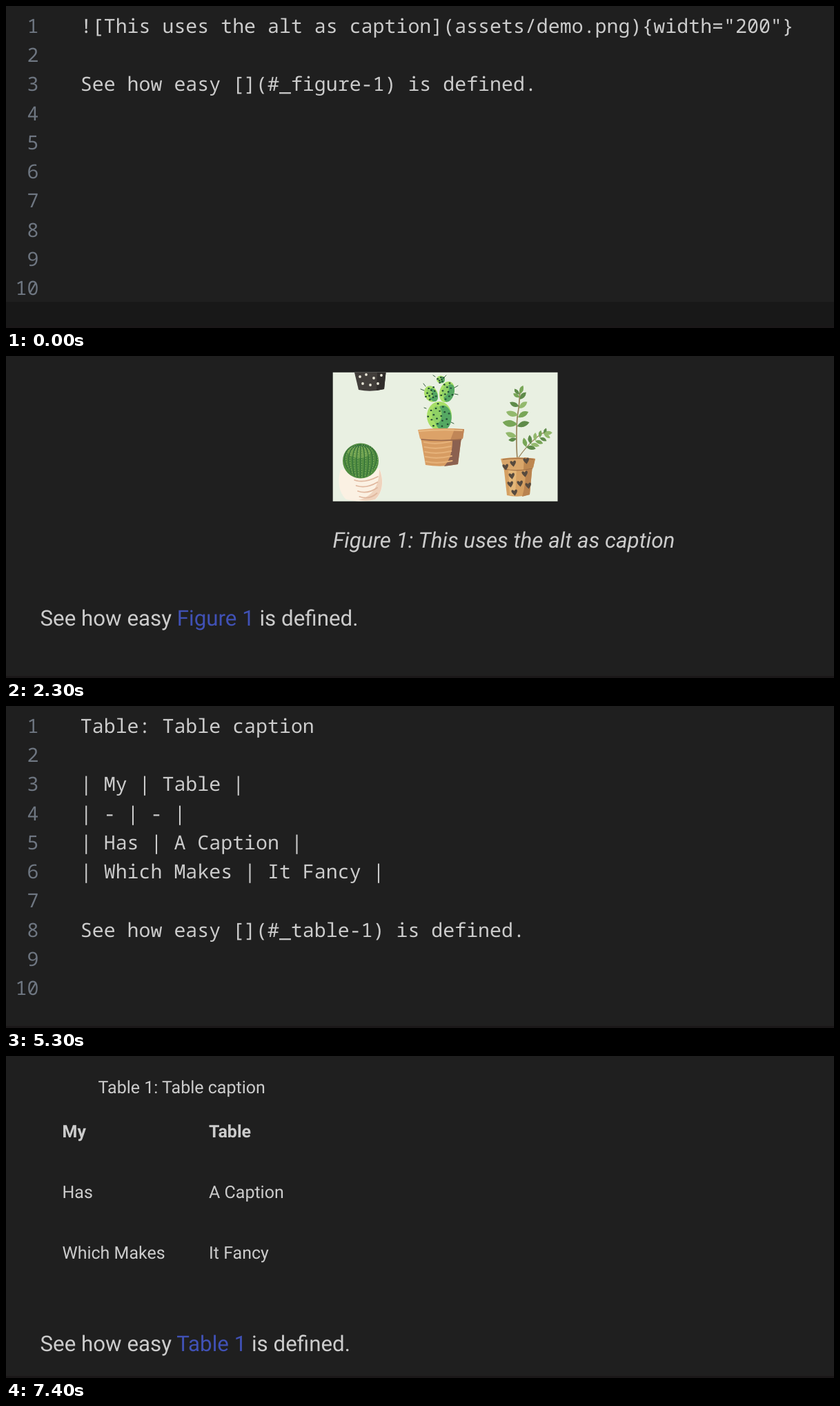
Write an HTML page that moves like this. It is 1200 by 467 pixels and loops after 8000 ms.

```html
<!DOCTYPE html>
<html lang="en">
<head>
<meta charset="utf-8">
<title>Captions demo</title>
<style>
  html, body { margin: 0; width: 100%; height: 100%; overflow: hidden; background: #1f1f1f; }
  svg { display: block; width: 100vw; height: 100vh; }
  text { fill: #ccc; white-space: pre; text-rendering: geometricPrecision; }
  .code { font: 500 28.25px "Noto Sans Mono", monospace; font-variant-ligatures: none; }
  .number { fill: #6e7681; text-anchor: end; }
  .body { font: 31.3px Roboto, sans-serif; }
  .caption { font: italic 31.46px Roboto, sans-serif; }
  .cell { font: 25px Roboto, sans-serif; }
  .bold { font-weight: 700; }
  .link { fill: #4051b5; }
</style>
</head>
<body>
<svg id="stage" viewBox="0 0 1200 467" preserveAspectRatio="none"></svg>
<script>
const LOOP = 8000;
const SCENE_STARTS = [0, 500, 3500, 6500];
const stage = document.getElementById("stage");

function add(parent, tag, attrs = {}, content = "") {
  const node = document.createElementNS("http://www.w3.org/2000/svg", tag);
  for (const key in attrs) node.setAttribute(key, attrs[key]);
  node.textContent = content;
  return parent.appendChild(node);
}
const path = (g, d, fill) => add(g, "path", { d, fill });
const stroke = (g, d, color, width = 1) =>
  add(g, "path", { d, fill: "none", stroke: color, "stroke-width": width, "stroke-linecap": "round" });
const oval = (g, cx, cy, rx, ry, fill, angle = 0) =>
  add(g, "ellipse", { cx, cy, rx, ry, fill, transform: `rotate(${angle} ${cx} ${cy})` });
const box = (g, x, y, width, height, fill) => add(g, "rect", { x, y, width, height, fill });
const label = (g, x, y, style, content) => add(g, "text", { x, y, class: style }, content);

function editor(g, lines) {
  for (let i = 0; i < 10; i++) {
    const y = 39 + i * 42.22;
    label(g, 47.5, y, "code number", i + 1);
    if (lines[i]) label(g, 107.8, y, "code", lines[i]);
  }
}

function sentence(g, y, link) {
  const line = label(g, 49.5, y, "body", "See how easy ");
  add(line, "tspan", { class: "link" }, link);
  add(line, "tspan", {}, " is defined.");
}

function darkPot(g) {
  path(g, "M505 24H550.5L548 48Q529 53 511 49Z", "#423e3b");
  path(g, "M538 24H550.5L548 48L537 50Z", "#302d2b");
  for (const [x, y] of [[513, 30], [522, 27], [533, 32], [544, 28], [517, 40], [528, 42], [539, 40]])
    oval(g, x, y, 1.9, 1.9, "#e9e6d8");
}

function ballCactus(g) {
  path(g, "M485 165C480 180 482 198 493 208Q514 213 536 208C547 196 548 178 541 163Z", "#fbf1e3");
  path(g, "M541 164C548 180 546 198 535 208Q524 211 511 209C530 204 541 190 541 164Z", "#efd3bd");
  for (const y of [180, 188, 196, 204])
    stroke(g, `M${504 + (y - 176) * .3} ${y}q14 5 ${35 - (y - 176) * .35} -5`, "#e0b89f", 1.8);
  oval(g, 514, 152, 26, 25.5, "#508c40");
  oval(g, 512, 138, 17, 10, "#6fa24f");
  for (let i = -4; i <= 4; i++) {
    const bulge = i * 6, bottom = 152 + 24 * Math.sqrt(1 - (i / 4.6) ** 2);
    const ridge = `M514 129C${514 + bulge} 129 ${514 + bulge * 1.15} 150 ${514 + bulge * .75} ${bottom}`;
    stroke(g, ridge, "#34703a", 1.3);
    add(g, "path", { d: ridge, fill: "none", stroke: "#a5c777", "stroke-dasharray": "1 2.5", transform: "translate(1.6 0)" });
  }
}

function pad(g, x, y, rx, ry, angle) {
  oval(g, x, y, rx, ry, "#a8df67", angle);
  oval(g, x + rx * .3, y + ry * .12, rx * .68, ry * .85, "#55a862", angle);
  oval(g, x - rx * .2, y - ry * .1, rx * .4, ry * .6, "#8fd065", angle);
  const spots = Math.round(rx * .9 + 2);
  for (let i = 0; i < spots; i++) {
    const a = i * 2.4, r = Math.sqrt((i + .5) / spots) * .92;
    oval(g, x + Math.cos(a) * rx * r, y + Math.sin(a) * ry * r, 1.4, 1.2, "#244c36");
  }
}

function tallCactus(g) {
  pad(g, 616, 55, 9.5, 12, -25);
  pad(g, 639, 52, 10.5, 15.5, 18);
  pad(g, 630, 34, 6, 5.5, 0);
  pad(g, 628, 87, 18, 21, 0);
  stroke(g, "M606 50l-5 -2M608 44l-3 -4M650 46l5 -3M650 55l5 1M622 30l-3 -2M635 31l3 -3M609 76l-3 -1M645 96l4 2", "#355c3c");
  path(g, "M601 118H660L655 157Q631 162 608 158Z", "#d79c62");
  path(g, "M647 118H660L655 157L635 160Q648 146 647 118Z", "#8b6150");
  for (let i = 0; i < 5; i++) stroke(g, `M${606 + i * .6} ${125 + i * 7}q17 4 38 -1`, "#e6b27a", 2.2);
  path(g, "M597 107Q630 103 664 106L662 120Q630 124 600 120Z", "#dca268");
  path(g, "M650 106L664 106L662 120L644 122Z", "#c08657");
  stroke(g, "M599 109Q629 106 661 108", "#e9b981", 2);
  stroke(g, "M602 121Q630 124 660 121", "#99684b", 1.4);
}

const LEAF_GREENS = ["#78a657", "#5f8b4a", "#93b96d"];
function leaf(g, x, y, angle, length, shade) {
  add(g, "path", {
    d: `M0 0Q${length * .55} ${-length * .5} ${length} 0Q${length * .5} ${length * .4} 0 0Z`,
    fill: LEAF_GREENS[shade % 3],
    transform: `translate(${x} ${y}) rotate(${angle})`
  });
}

function heart(g, x, y) {
  add(g, "path", {
    d: "M0 4.8C-3 1-5-1-4-3.5C-3-5-.7-4 0-2C.7-4 3-5 4-3.5C5-1 3 1 0 4.8Z",
    fill: "#574a3e", transform: `translate(${x} ${y}) rotate(-8)`
  });
}

function leafyPlant(g) {
  stroke(g, "M741 149C739 125 740 92 742 82S744 62 745 50", "#98835a", 1.7);
  stroke(g, "M743 147Q755 130 768 119T788 110", "#98835a", 1.2);
  for (let i = 0; i < 4; i++) {
    const y = 60 + i * 13, x = 744.5 - i * 1.2;
    leaf(g, x, y, 212 - i * 8, 11 + i * 3.5, i);
    leaf(g, x, y + 3, -48 + i * 10, 14 + i * 1.5, i + 1);
  }
  leaf(g, 745, 55, -70, 13, 0);
  leaf(g, 744, 56, -130, 11, 1);
  leaf(g, 740, 117, 200, 17, 2);
  leaf(g, 740, 120, 170, 12, 1);
  for (let i = 0; i < 5; i++) {
    const x = 754 + i * 6.5, y = 132 - i * 4.5;
    leaf(g, x, y, -105 + i * 8, 14 - i, i);
    leaf(g, x, y, 10 + i * 5, 14 - i, i + 1);
  }
  leaf(g, 779, 113, -8, 13, 2);
  path(g, "M721 158H763L759 201Q742 206 726 202Z", "#d5a062");
  path(g, "M753 158H763L759 201L748 204Q754 185 753 158Z", "#b9834f");
  path(g, "M728 164L740 163L738 202L730 202Z", "#e3b678");
  path(g, "M717 149Q742 145 767 149L764 162Q742 167 721 163Z", "#d9a66a");
  path(g, "M751 147L767 149L764 162L750 165Z", "#bd8750");
  stroke(g, "M720 150Q742 147 764 150", "#a87344", 1.3);
  stroke(g, "M722 164Q742 168 763 163", "#a17045", 1.2);
  for (const [x, y] of [[735, 156], [754, 152], [724, 161], [733, 174], [752, 171], [745, 185], [731, 186], [757, 188], [737, 198]])
    heart(g, x, y);
}

function picture(g) {
  const clip = add(add(stage, "defs"), "clipPath", { id: "frame" });
  box(clip, 473.7, 23.8, 325.8, 187);
  const art = add(g, "g", { "clip-path": "url(#frame)" });
  box(art, 473, 23, 327, 189, "#e9f0e2");
  for (const draw of [darkPot, ballCactus, tallCactus, leafyPlant]) draw(art);
}

const builders = [
  g => {
    box(g, 0, 429, 1200, 38, "#181818");
    editor(g, [
      '![This uses the alt as caption](assets/demo.png){width="200"}', "",
      "See how easy [](#_figure-1) is defined."
    ]);
  },
  g => {
    picture(g);
    label(g, 473.5, 278, "caption", "Figure 1: This uses the alt as caption");
    sentence(g, 391, "Figure 1");
  },
  g => editor(g, [
    "Table: Table caption", "",
    "| My | Table |",
    "| - | - |",
    "| Has | A Caption |",
    "| Which Makes | It Fancy |", "",
    "See how easy [](#_table-1) is defined."
  ]),
  g => {
    label(g, 133.5, 54, "cell", "Table 1: Table caption");
    [["My", "Table"], ["Has", "A Caption"], ["Which Makes", "It Fancy"]].forEach((row, i) =>
      row.forEach((value, j) => label(g, 81.5 + j * 212.5, 118 + i * 88, i ? "cell" : "cell bold", value)));
    sentence(g, 427.5, "Table 1");
  }
];

box(stage, 0, 0, 1200, 467, "#1f1f1f");
const scenes = builders.map(build => {
  const g = add(stage, "g");
  build(g);
  return g;
});
box(stage, 0, 464, 1200, 3, "#1a1718");

function render(time) {
  const current = SCENE_STARTS.findLastIndex(start => time % LOOP >= start);
  scenes.forEach((g, i) => g.setAttribute("display", i === current ? "inline" : "none"));
}
function tick() {
  render(performance.now());
  requestAnimationFrame(tick);
}
tick();
</script>
</body>
</html>
```
